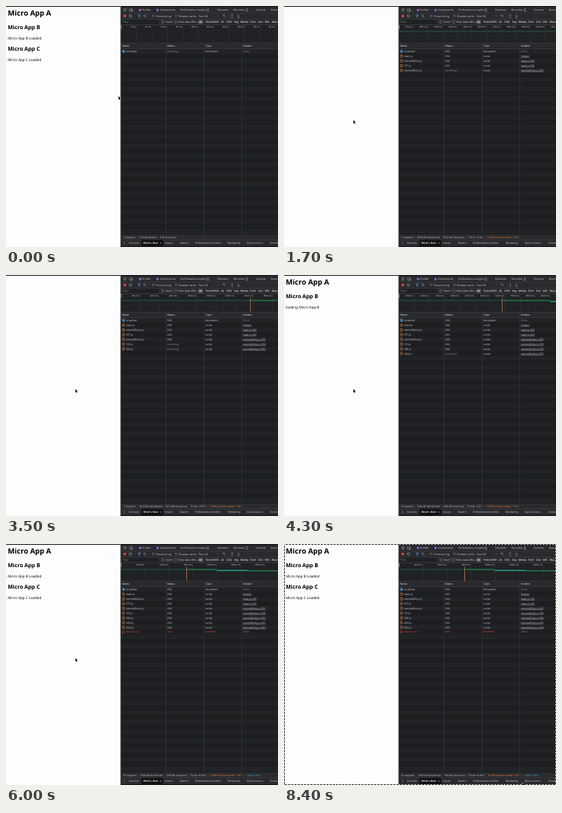
These frames come from a looping animation (341x302 px, 8600 ms). An HTML page with a canvas:

```html
<!DOCTYPE html>
<html lang="en">
<head>
<meta charset="utf-8">
<title>Micro apps loading</title>
<style>
html, body { margin: 0; width: 100%; height: 100%; overflow: hidden; background: #1e2023; }
canvas { display: block; width: 341px; height: 302px; }
</style>
</head>
<body>
<canvas></canvas>
<script>
const W = 341, H = 302, LOOP = 8600, LEFT = 144, TIMELINE_WIDTH = 416;
const canvas = document.querySelector('canvas');
const ctx = canvas.getContext('2d');
const dpr = window.devicePixelRatio || 1;
canvas.width = W * dpr;
canvas.height = H * dpr;

const UI = 'Inter, Roboto, sans-serif', PAGE = '"Open Sans", "Noto Sans", sans-serif';
const INK = '#c9cbce', DIM = '#85888c', RED = '#e8453c', ORANGE = '#ee7b3c', BLUE = '#4f9fe8';
const BAR = '#292a2d', LINE = '#43464a';

// name, type, initiator, start, done
const requests = [
  ['localhost', 'document', 'Other', 0, 600],
  ['main.js', 'script', '(index)', 600, 1100],
  ['remoteEntry.js', 'script', 'main.js:201', 1100, 1500],
  ['977.js', 'script', 'main.js:201', 1100, 1600],
  ['remoteEntry.js', 'script', 'remoteEntry.js:251', 1600, 2600],
  ['731.js', 'script', 'remoteEntry.js:169', 2600, 3600],
  ['138.js', 'script', 'remoteEntry.js:180', 2600, 3900],
  ['429.js', 'script', 'remoteEntry.js:251', 3900, 4500],
  ['650.js', 'script', 'remoteEntry.js:180', 4500, 5200],
  ['favicon.ico', 'text/html', 'Other', 5300, 5800]
];

// since, transferred, resources, finish
const totals = [
  [0, '0 B', '0 B', ''],
  [600, '506 B', '126 B', '586 ms'],
  [1100, '82.1 kB', '81.4 kB', '1.30 s'],
  [1600, '87.8 kB', '86.5 kB', '2.14 s'],
  [2600, '93.9 kB', '92.0 kB', '2.67 s'],
  [3900, '240 kB', '238 kB', '4.27 s'],
  [4500, '244 kB', '243 kB', '4.84 s'],
  [5200, '248 kB', '249 kB', '5.43 s'],
  [5800, '248 kB', '249 kB', '6.46 s']
];

// animation time -> milliseconds spanned by the overview
const spans = [[0, 107], [700, 743], [1700, 2270], [2900, 2830], [4300, 4380],
  [4600, 4700], [5400, 4700], [5900, 6900], [LOOP, 6900]];

// start, end, y, colour of overview bars
const bars = [
  [0, 566, 31.5, '#25584f'], [566, 1360, 31.5, '#25584f'],
  [1360, 1980, 31.5, '#20a65a'], [1980, 2640, 32.3, '#2476a8'],
  [2000, 2670, 33, '#20a65a'], [2670, 4270, 33.2, '#20a65a'],
  [4270, 4840, 34, '#2476a8'], [4840, 6460, 34.4, '#20a65a']
];

function track(points, t) {
  const i = Math.max(1, points.findIndex(p => p[0] >= t));
  const [t0, a] = points[i - 1], [t1, b] = points[i];
  return a + (b - a) * (t - t0) / (t1 - t0);
}

function ease(t, from, to) {
  const p = Math.min(1, Math.max(0, (t - from) / (to - from)));
  return p * p * (3 - 2 * p);
}

function rect(x, y, w, h, color) {
  ctx.fillStyle = color;
  ctx.fillRect(x, y, w, h);
}

// y is the vertical middle of the lower-case line; returns the right edge
function text(s, x, y, { color = INK, size = 3.25, weight = 400, font = UI, align = 'left' } = {}) {
  ctx.font = `${weight} ${size}px ${font}`;
  ctx.fillStyle = color;
  ctx.textAlign = align;
  ctx.fillText(s, x, y + size * 0.35);
  return x + ctx.measureText(s).width;
}

function stroke(path, color = '#9a9da1', width = 0.5) {
  ctx.strokeStyle = color;
  ctx.lineWidth = width;
  ctx.stroke(new Path2D(path));
}

function dot(x, y, r, color) {
  ctx.fillStyle = color;
  ctx.beginPath();
  ctx.arc(x, y, r, 0, 7);
  ctx.fill();
}

function checkbox(x, y) {
  ctx.strokeStyle = '#85888c';
  ctx.lineWidth = 0.4;
  ctx.strokeRect(x - 1.3, y - 1.3, 2.6, 2.6);
}

function flask(x, y) {
  stroke(`M${x - .8} ${y - 1.6}h1.6M${x - .4} ${y - 1.6}v1.3l-1 1.8h2.8l-1 -1.8v-1.3`);
}

function drawPage(t) {
  rect(0, 0, LEFT, H, '#fdfdfd');
  rect(0, 0, LEFT, 1, '#25272a');
  const put = (s, y, size, weight) => text(s, 2.2, y, { color: '#000', size, weight, font: PAGE });
  const old = t < 600;
  if (old || t >= 3900) {
    const loadedB = old || t >= 4500, loadedC = old || t >= 5200;
    put('Micro App A', 9, 9.1, 700);
    put('Micro App B', 26.6, 6.8, 700);
    put(loadedB ? 'Micro App B Loaded' : 'loading Micro App B', 40.3, 4.5, 400);
    if (loadedB) {
      put('Micro App C', 54, 6.8, 700);
      put(loadedC ? 'Micro App C Loaded' : 'loading Micro App C', 67.7, 4.5, 400);
    }
  }
}

function drawToolbars() {
  rect(LEFT, 0, W - LEFT, 24, BAR);
  rect(LEFT, 0, W - LEFT, 1, '#17181a');
  for (const y of [8.8, 16.3, 23.5]) rect(LEFT, y, W - LEFT, 0.4, LINE);

  stroke('M149.6 6.5h-1.9v-3h3.2v1.2M149.3 4.8l1.8 1.8M149.3 4.8v1.4M149.3 4.8h1.4');
  stroke('M154.6 3.6h3.4v2.8h-3.4zM157 4.7h1.7v2h-1.7z');
  rect(161.5, 3, 0.4, 4, LINE);
  dot(168, 5, 1.5, '#9a69d8');
  dot(190, 5, 1.5, '#9a69d8');
  [['Profiler', 170.5], ['Components', 192.8], ['Performance insights', 218.5], ['Elements', 264.8],
    ['Recorder', 285.3], ['Console', 313], ['Sources', 332]].forEach(([s, x]) => text(s, x, 5));
  flask(253.2, 5);
  flask(302, 5);

  dot(149, 12.5, 1.8, '#d9493f');
  stroke('M154.3 12.5a1.7 1.7 0 1 0 3.4 0a1.7 1.7 0 1 0 -3.4 0M154.9 11.3l2.3 2.4');
  rect(161.5, 10.5, 0.4, 4, LINE);
  stroke('M165.3 11h3.4l-1.3 1.6v1.6h-.8v-1.6z', BLUE, 0.6);
  stroke('M172.5 12.1a1.2 1.2 0 1 0 2.4 0a1.2 1.2 0 1 0 -2.4 0M174.6 13l1.3 1.4');
  rect(179.3, 10.5, 0.4, 4, LINE);
  checkbox(184.5, 12.5);
  text('Preserve log', 188, 12.5);
  checkbox(213.8, 12.5);
  text('Disable cache', 217, 12.5);
  text('Fast 3G', 241.5, 12.5);
  stroke('M264.8 12l1 1l1 -1');
  stroke('M271 11.7q2 -1.5 4 0M272 12.9q1 -.8 2 0M274.2 13.5h1.6');
  rect(279, 10.5, 0.4, 4, LINE);
  stroke('M283.5 13.3v-2.6M282.4 11.7l1.1 -1.1l1.1 1.1M281.9 14.3h3.2');
  stroke('M291.5 10.6v2.6M290.4 12.2l1.1 1.1l1.1 -1.1M289.9 14.3h3.2');

  rect(145, 17.4, 46, 5.2, '#202124');
  text('Filter', 146, 20, { color: DIM });
  checkbox(196.5, 20);
  text('Invert', 200, 20);
  checkbox(213, 20);
  text('Hide data URLs', 216, 20);
  rect(241.3, 17.7, 5.4, 4.6, '#56595e');
  [['All', 242], ['Fetch/XHR', 250], ['JS', 269.2], ['CSS', 276.2], ['Img', 285.8], ['Media', 294],
    ['Font', 306], ['Doc', 316.2], ['WS', 324.5], ['Wasm', 333]]
    .forEach(([s, x]) => text(s, x, 20, { color: '#e2e4e6', weight: 500 }));
}

function drawOverview(t) {
  const scale = TIMELINE_WIDTH / track(spans, t);
  rect(LEFT, 24, W - LEFT, 22.5, '#202225');
  const steps = [1, 2, 5, 10, 20, 50, 100, 200, 500, 1000];
  const step = steps.find(s => s * scale >= 18);
  for (let ms = step; LEFT + (ms - step) * scale < W; ms += step) {
    const x = LEFT + ms * scale;
    rect(x, 24, 0.4, 22.5, '#393c40');
    text(ms + ' ms', x - 0.8, 26.5, { size: 2.8, align: 'right' });
  }
  for (const [from, to, y, color] of bars) {
    const end = Math.min(to, TIMELINE_WIDTH / scale);
    if (t >= 600 && end > from) rect(LEFT + from * scale, y, (end - from) * scale, 0.9, color);
  }
  if (t >= 1200) rect(LEFT + 1360 * scale, 28.5, 0.8, 18, '#d8653a');
  rect(LEFT, 24, 0.8, 5, '#8d9195');
  rect(LEFT, 46.2, W - LEFT, 0.5, LINE);
}

function drawTable(t) {
  const rowHeight = 5.93, top = 54;
  rect(LEFT, 46.7, W - LEFT, top - 46.7, BAR);
  for (let i = 0, y = top; y < 287; i++, y += rowHeight)
    rect(LEFT, y, W - LEFT, rowHeight, i % 2 ? '#1c1e20' : '#212326');
  for (const x of [200.5, 248.5, 295.3]) rect(x, 46.7, 0.5, 240.3, '#3b3e42');
  rect(LEFT, 53.6, W - LEFT, 0.4, LINE);
  [['Name', 145.5], ['Status', 202], ['Type', 250], ['Initiator', 297]]
    .forEach(([s, x]) => text(s, x, 50.2, { color: '#e0e2e4' }));

  requests.forEach(([name, type, initiator, start, done], i) => {
    if (t < start) return;
    const y = top + rowHeight * (i + 0.5);
    const pending = t < done, failed = i === 9 && !pending;
    const color = failed ? RED : INK;
    const icon = i === 0 ? BLUE : failed ? RED : '#e0813b';
    ctx.strokeStyle = icon;
    ctx.lineWidth = 0.5;
    ctx.strokeRect(146.1, y - 1.5, 2.6, 3);
    if (i === 0) rect(146.6, y - 1, 1.6, 2, icon);
    else if (i < 9) stroke(`M147 ${y - .6}l-.4 .6l.4 .6M147.8 ${y - .6}l.4 .6l-.4 .6`, icon, 0.35);
    text(name, 150.5, y, { color });
    text(pending ? '(pending)' : failed ? '404' : '200', 202, y, { color: pending ? DIM : color });
    text(type, 250, y, { color });
    if (initiator === 'Other') {
      text(initiator, 297, y, { color: DIM });
    } else {
      const end = text(i === 1 && pending ? ':3000/:1' : initiator, 297, y);
      rect(297, y + 1.6, end - 297, 0.3, INK);
    }
  });
}

function drawFooter(t) {
  rect(LEFT, 287, W - LEFT, H - 287, BAR);
  rect(LEFT, 286.8, W - LEFT, 0.4, LINE);
  const [, transferred, resources, finish] = totals.filter(row => t >= row[0]).pop();
  const count = requests.filter(r => t >= r[3]).length;
  const parts = [[count + ' requests'], [transferred + ' transferred'], [resources + ' resources']];
  if (finish) parts.push(['Finish: ' + finish]);
  if (t >= 1200) parts.push(['DOMContentLoaded: 1.36 s', ORANGE]);
  if (t >= 5800) parts.push(['Load: 6.46 s', '#38b5d0']);
  let x = 147;
  parts.forEach(([s, color], i) => {
    if (i) rect(x - 2.4, 287.9, 0.4, 4.2, LINE);
    x = text(s, x, 290, { color, size: 3.15 }) + 4.5;
  });

  rect(LEFT, 292.8, W - LEFT, 0.5, LINE);
  for (const y of [295.5, 297, 298.5]) dot(148.5, y, 0.4, INK);
  rect(170, 293.3, 27, 7.7, '#101113');
  text("What's New", 172, 297, { color: '#fff', weight: 500 });
  stroke('M193.2 296.2l1.7 1.7M194.9 296.2l-1.7 1.7', INK, 0.4);
  [['Console', 154], ['Issues', 199.3], ['Search', 217.8], ['Performance monitor', 236.8],
    ['Rendering', 277.8], ['Quick source', 301.8], ['Coverage', 331]].forEach(([s, x]) => text(s, x, 297));
  rect(LEFT, 301, W - LEFT, 1, '#17181a');
}

function drawSelection() {
  ctx.lineWidth = 1;
  ctx.strokeStyle = '#111';
  ctx.strokeRect(0.5, 0.5, W - 1, H - 1);
  ctx.strokeStyle = '#ddd';
  ctx.setLineDash([2, 2]);
  ctx.strokeRect(0.5, 0.5, W - 1, H - 1);
  ctx.setLineDash([]);
}

function drawCursor(t) {
  const rest = ease(t, 0, 500), leave = ease(t, 6900, 7200);
  const x = 141 - 54 * rest + 212 * leave, y = 113 + 30 * rest + 156 * leave;
  const arrow = new Path2D('M0 0V4.2L1 3.3L1.7 4.9L2.4 4.6L1.7 3.1H3Z');
  ctx.save();
  ctx.translate(x, y);
  ctx.strokeStyle = '#fff';
  ctx.lineWidth = 0.7;
  ctx.stroke(arrow);
  ctx.fillStyle = '#000';
  ctx.fill(arrow);
  ctx.restore();
}

function frame() {
  const t = Math.floor(performance.now() % LOOP / 100) * 100;
  ctx.setTransform(dpr, 0, 0, dpr, 0, 0);
  ctx.textRendering = 'geometricPrecision';
  drawPage(t);
  drawToolbars();
  drawOverview(t);
  drawTable(t);
  drawFooter(t);
  rect(LEFT - 0.6, 0, 0.6, H, '#54575b');
  if (t >= 7000) drawSelection();
  drawCursor(t);
  requestAnimationFrame(frame);
}
frame();
</script>
</body>
</html>
```
